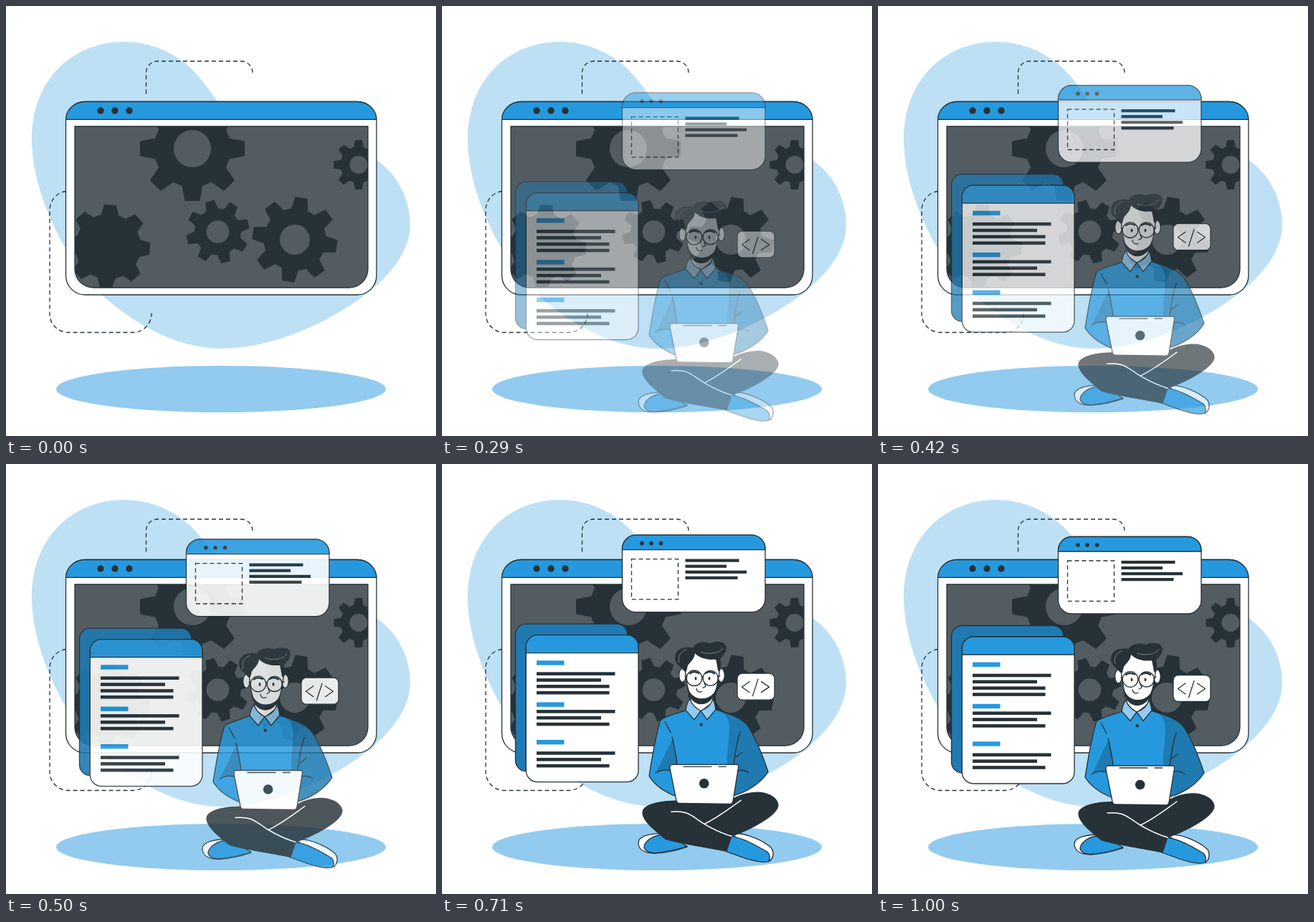
These frames come from a looping animation (600 by 600 pixels, 1040 ms). An HTML page:

```html
<!DOCTYPE html>
<html lang="en">
<head>
<meta charset="utf-8">
<title>Developer at work</title>
<style>
  html, body { margin: 0; width: 100%; height: 100%; overflow: hidden; background: #fff; }
  svg { display: block; width: 100%; height: 100%; }
  .ink { fill: #263238; }
  .blue { fill: #2699de; }
  .deep { fill: #1f7ab2; }
  .pale { fill: #92cbef; }
  .white { fill: #fff; }
  .edge, .line { stroke: #263238; stroke-width: 1.3; stroke-linejoin: round; stroke-linecap: round; }
  .line { fill: none; }
  .brow { stroke-width: 2.3; }
  .dash { fill: none; stroke: #263238; stroke-width: 1.3; stroke-dasharray: 6 4; }
</style>
</head>
<body>
<svg viewBox="0 0 600 600">
  <clipPath id="screen"><path d="M96 168H505V367a26 26 0 0 1-26 26H122a26 26 0 0 1-26-26Z"/></clipPath>

  <path fill="#bde0f5" d="M165 50C205 50 240 68 262 91C278 108 288 124 300 140C350 205 450 175 517 215C548 236 564 272 564 305C564 340 540 371 507 398.5C452 442 370 478 302 478C235 478 175 440 132 402C88 362 36 265 36 187C36 100 95 50 165 50Z"/>
  <ellipse class="pale" cx="300" cy="534.5" rx="230" ry="32.5"/>
  <path class="dash" d="M195.5 122.5V93a16 16 0 0 1 16-16H328a16 16 0 0 1 16 17"/>
  <path class="dash" d="M84 258.5C70 260 61 272 61 285V429a26 26 0 0 0 26 26.5H177a26 26 0 0 0 26-27"/>

  <rect class="white edge" x="83.5" y="133.5" width="433.5" height="269.5" rx="27"/>
  <path class="blue edge" d="M83.5 158.3a27 25 0 0 1 27-24.8H490a27 25 0 0 1 27 24.8Z"/>
  <g class="ink"><circle cx="132" cy="146" r="4.7"/><circle cx="152" cy="146" r="4.7"/><circle cx="172" cy="146" r="4.7"/></g>
  <path fill="#535c61" d="M96 168H505V367a26 26 0 0 1-26 26H122a26 26 0 0 1-26-26Z"/>
  <g id="gears" clip-path="url(#screen)"></g>
  <path class="line" d="M96 168H505V367a26 26 0 0 1-26 26H122a26 26 0 0 1-26-26Z"/>

  <g id="panels" opacity="0">
    <!-- document cards -->
    <rect class="deep edge" x="102.5" y="225.5" width="156.5" height="205.5" rx="15"/>
    <rect class="white edge" x="117.3" y="241" width="156.7" height="205" rx="16"/>
    <path class="blue edge" d="M117.3 266V257a16 16 0 0 1 16-16H258a16 16 0 0 1 16 16V266Z"/>

    <!-- small window -->
    <rect class="white edge" x="251.5" y="101.5" width="199.5" height="107.5" rx="19"/>
    <path class="blue edge" d="M251.5 122V120.5a19 19 0 0 1 19-19H432a19 19 0 0 1 19 19V122Z"/>
    <g class="ink"><circle cx="279" cy="113" r="2.8"/><circle cx="292" cy="113" r="2.8"/><circle cx="305.5" cy="113" r="2.8"/></g>
    <rect class="dash" x="264.5" y="135" width="65" height="56.3"/>
    <g id="bars"></g>

    <!-- code badge -->
    <rect class="white edge" x="412" y="294.5" width="52" height="37" rx="7"/>
    <path class="line" d="M429 306L418.5 313.5L429 321M441 302.5L433.5 326M445.5 306L456.5 313.5L445.5 321"/>
  </g>

  <g id="man" opacity="0">
    <!-- shoes and legs -->
    <path class="white edge" d="M310 517C290 517 274 521 274 530C274 540 283 545 297 545C315 544 330 540 342 536Z"/>
    <path class="blue edge" d="M304 519C290 522 282 530 282 537C284 543 290 544.5 297 544.5C315 543 330 539 342 535L314 518Z"/>
    <path class="white edge" d="M405 517C425 516 450 528 460 538C464 545 462 552 457 556L430 545Z"/>
    <path class="blue edge" d="M403 521C420 523 440 535 454 543C458 547 458 553 456 556C445 560 425 553 396 542Z"/>
    <path class="ink edge" d="M320 472C297 473 279 479 280 489C281 500 296 512 312 525C335 532 370 536 397 542L404 521C430 512 469 492 469 477C467 465 450 459 437 460C425 461 415 464 408 468Z"/>
    <path fill="none" stroke="#fff" stroke-width="1.5" stroke-linecap="round" d="M320 487C345 485 348 493 366 504C378 511 390 517 404 521M417 471C400 483 385 495 366 504"/>

    <!-- sweater -->
    <path class="blue" d="M341 345C328 350 312 353 305 359C298 380 293 412 289 437C297 450 312 460 328 466L405 465C425 460 445 447 455 431C448 410 438 385 428 369C420 356 400 350 381 344Z"/>
    <path class="deep" d="M386 346C402 352 402 366 400 385C399 400 397 410 398 421H412L405 465C425 460 445 447 455 431C448 410 438 385 428 369C420 356 400 350 386 346Z"/>
    <path class="deep" d="M323 384C314 398 306 420 298 433C306 428 312 428 320 430L328 421Z"/>
    <path class="line" d="M341 345C328 350 312 353 305 359C298 380 293 412 289 437C297 450 312 460 328 466M405 465C425 460 445 447 455 431C448 410 438 385 428 369C420 356 400 350 381 344"/>
    <path class="line" d="M311 361L319 376M321 383C324 396 327 409 328 421M298 433C306 428 312 428 320 430M416 375C411 390 409 405 407 421M410 411L419 404M411 430C418 428 424 429 428 433"/>

    <!-- head -->
    <path class="white edge" d="M347 320V336L361 347L378 334V320Z"/>
    <path class="pale edge" d="M346 329C342 334 341 339 340 345L352 358.5L361 346L370 358.5L382 344C381 338 380 333 378 329C376 338 369 343 361 346C353 342 348 337 346 329Z"/>
    <circle class="ink" cx="361.7" cy="365.3" r="2.2"/>
    <ellipse class="white edge" cx="335.5" cy="296.5" rx="4.8" ry="9.5"/>
    <ellipse class="white edge" cx="389.5" cy="296.5" rx="4.8" ry="9.5"/>
    <path class="white edge" d="M339 284C340 300 342 313 346 324C350 333 356 336 362 336C371 336 379 328 383 314C386 303 388 290 387 276L352 262Z"/>
    <path class="ink" d="M342 313C344 330 353 337 362 337C373 337 381 327 384 313C380 323 373 329 362 329C352 329 346 322 342 313Z"/>
    <path class="ink" d="M338 291C333 284 324 281 325 271C326 260 337 256 350 258C354 250 366 249 374 252C383 248 396 249 397 258C397 265 391 270 388 274C390 280 389 286 388 291L385 290C384 283 383 278 382 274C372 276 360 273 353 266C352 275 345 279 343 283L341 291Z"/>
    <path fill="none" stroke="#8a959a" stroke-width=".8" d="M331 279C328 270 334 262 341 261M361 264C372 268 388 266 392 258"/>
    <circle class="line" cx="352" cy="300.5" r="10.8"/>
    <circle class="line" cx="374.7" cy="300.5" r="10.5"/>
    <path class="line" d="M339 298L341.5 299M362.5 299Q363.5 298 364.5 299M385 299L388 297M366 307L368 312L364 314M355 315C356 320 360 321 363 319"/>
    <path class="line brow" d="M346 294Q351 290 358 293.5M368 293.5Q374 290 380 294"/>
    <g class="ink"><ellipse cx="354" cy="301" rx="1.4" ry="2.4"/><ellipse cx="373" cy="301" rx="1.4" ry="2.4"/></g>

    <!-- laptop -->
    <path class="white edge" d="M321 421H411Q414 421 413.5 425L406 472Q405 476 402 476L331 475Q328 475 327 471L318 426Q317.5 421 321 421Z"/>
    <path class="line" d="M337 424H376M386 424H396.5"/>
    <circle class="ink" cx="365.7" cy="447.5" r="6.8"/>
  </g>
</svg>
<script>
const get = id => document.getElementById(id);

// Eight-toothed gear with an optional hole
function gear(x, y, r, turn, hole, root = 0.73) {
  const points = [];
  for (let i = 0; i < 8; i++) {
    for (const [a, k] of [[-15.5, root], [-8.2, 1], [8.2, 1], [15.5, root]]) {
      const angle = (i * 45 + turn + a) * Math.PI / 180;
      points.push([x + r * k * Math.cos(angle), y + r * k * Math.sin(angle)].map(n => n.toFixed(1)));
    }
  }
  return `<polygon class="ink" points="${points.join(' ')}"/>` +
    `<circle cx="${x}" cy="${y}" r="${hole}" fill="#535c61"/>`;
}
get('gears').innerHTML =
  gear(260, 199, 73.8, 0, 26) +
  gear(142.5, 335.7, 58.8, 3, 0, 0.78) +
  gear(295.5, 315, 44.5, -14.5, 15.8) +
  gear(403, 326, 59.8, 9, 21) +
  gear(492, 221.5, 35, 0, 12.5);

const bar = (type, x, y, end, h) =>
  `<rect class="${type}" x="${x}" y="${y - h / 2}" width="${end - x}" height="${h}"/>`;
const lines = (ends, x, top, step, h) =>
  ends.map((end, i) => bar('ink', x, top + i * step, end, h)).join('');
const cardEnds = [241.5, 222, 233.5, 233.5];
const sections = [[279.8, 295, 4], [338, 347.7, 3], [390.5, 405.8, 3]];
get('bars').innerHTML = sections.map(([title, top, count]) =>
  bar('blue', 132, title, 170.5, 6.4) + lines(cardEnds.slice(0, count), 132, top, 8.85, 4.6)
).join('') + lines([414.5, 397, 425, 412.5], 339.5, 137, 8.05, 4.2);

// cubic-bezier(.36, -.01, .5, 1.38): rises past 1, then settles
const bezier = (a, b, s) => 3 * a * s * (1 - s) ** 2 + 3 * b * s * s * (1 - s) + s ** 3;
function ease(x) {
  if (x >= 1) return 1;
  let low = 0, high = 1;
  for (let i = 0; i < 20; i++) {
    const mid = (low + high) / 2;
    if (bezier(.36, .5, mid) < x) low = mid; else high = mid;
  }
  return bezier(-.01, 1.38, low);
}

function rise(node, x) {
  const p = ease(x);
  node.setAttribute('opacity', Math.max(0, Math.min(p, 1)));
  node.setAttribute('transform', `translate(0 ${36 * (1 - p)})`);
}

const panels = get('panels'), man = get('man');
const start = performance.now();
function draw() {
  const time = (performance.now() - start) % 1040;
  // 24 steps per second; the first two are empty
  const step = Math.floor((time + 4) * 0.024);
  const played = step < 2 ? 0 : step + 1;
  rise(panels, played / 22);
  rise(man, played / 24);
  requestAnimationFrame(draw);
}
draw();
</script>
</body>
</html>
```
